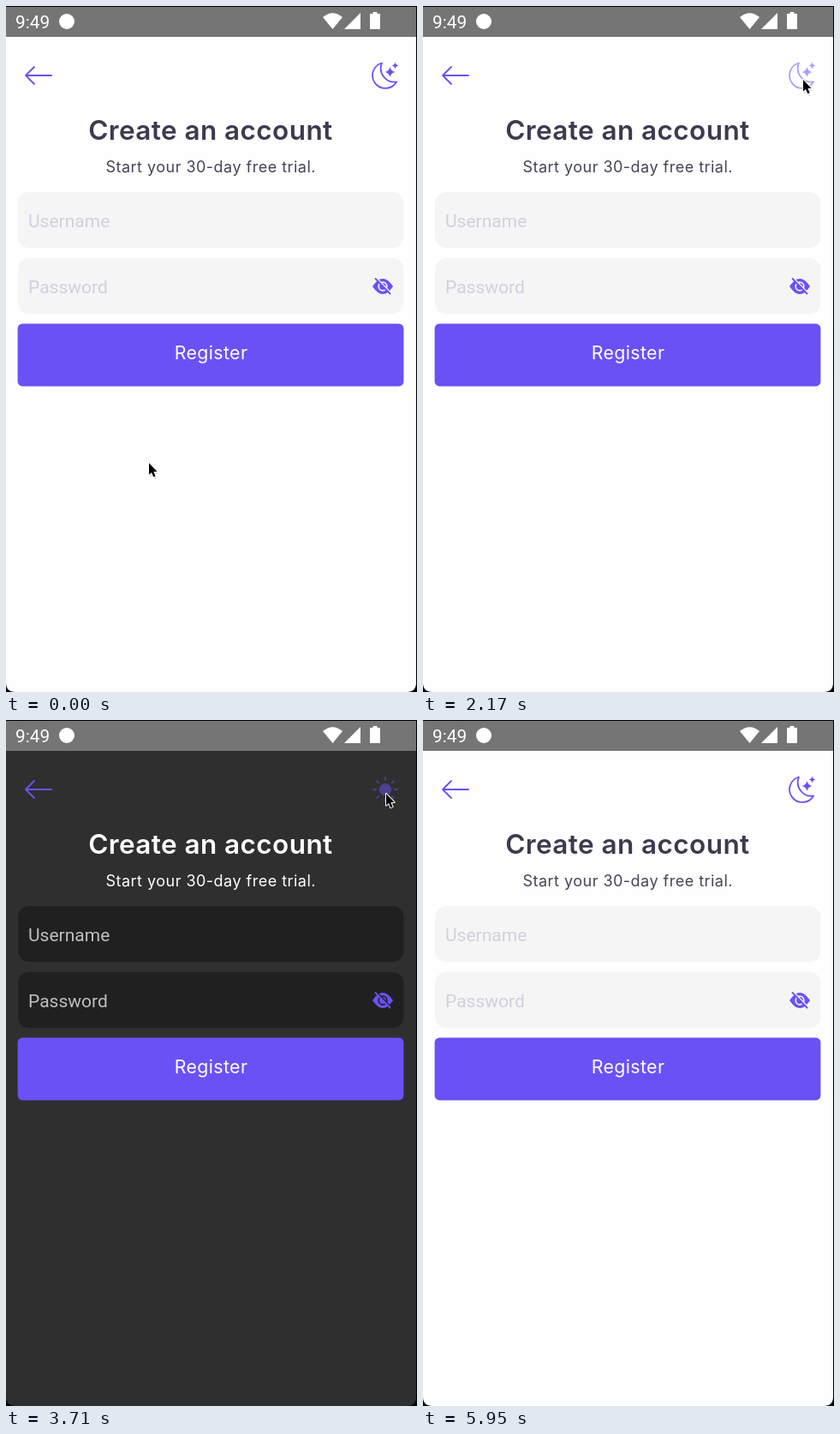
These frames come from a looping animation (480 by 800 pixels, 6020 ms). An HTML page:

```html
<!DOCTYPE html>
<html lang="en">
<head>
<meta charset="utf-8">
<title>Create an account</title>
<style>
  html, body { margin: 0; width: 100%; height: 100%; overflow: hidden; background: #000; }
  svg { display: block; width: 480px; height: 800px; }

  /* The 1 ms head start keeps each step on its 70 ms boundary. */
  .stage, .toggle, .cursor { animation: theme 6020ms -1ms infinite step-end; }
  .toggle { animation-name: press; }
  .cursor { animation-name: travel; }

  .screen { fill: var(--bg); }
  .field { fill: var(--field); }
  .hint { fill: var(--hint); font: 21px Roboto, sans-serif; }
  .title, .sub, .label { font-family: Poppins, Inter, sans-serif; text-anchor: middle; }
  .title { fill: var(--title); font-size: 31.5px; font-weight: 600; letter-spacing: .42px; }
  .sub { fill: var(--sub); font-size: 18px; letter-spacing: .48px; }
  .label { fill: #fff; font-size: 21.3px; letter-spacing: .4px; }
  .clock { fill: #fff; font: 20.8px Roboto, sans-serif; }
  .fill { fill: #6a51f5; }
  .line { fill: none; stroke: #6a51f5; stroke-width: 1.8; stroke-linecap: round; stroke-linejoin: round; }
  .cut { fill: none; stroke: var(--field); stroke-width: 1.7; }
  .moon { visibility: var(--moon); }
  .sun { visibility: var(--sun); }

  @keyframes theme {
    0%, 62.791%, 100% {
      --bg: #fefefe; --field: #f5f5f5; --hint: #d2d0de; --title: #3c3a4e; --sub: #454357;
      --moon: visible; --sun: hidden;
    }
    37.209% {
      --bg: #2f2f2f; --field: #202020; --hint: #bfbfbf; --title: #fff; --sub: #fff;
      --moon: hidden; --sun: visible;
    }
  }

  @keyframes press {
    0%, 41.86%, 67.442%, 100% { opacity: 1; }
    34.884%, 60.465% { opacity: .8; }
    36.047%, 62.791% { opacity: .55; }
    37.209%, 61.628% { opacity: .5; }
    38.372%, 63.953% { opacity: .65; }
    39.535%, 65.116% { opacity: .8; }
    40.698%, 66.279% { opacity: .92; }
  }

  @keyframes travel {
    0% { transform: translate(167px, 533px); animation-timing-function: steps(4); }
    4.651%, 11.628% { transform: translate(169px, 531px); animation-timing-function: steps(4); }
    16.279% { transform: translate(322px, 282px); animation-timing-function: steps(4); }
    20.93% { transform: translate(438px, 94px); animation-timing-function: steps(4); }
    25.581%, 77.907% { transform: translate(444px, 86px); animation-timing-function: steps(5); }
    83.721% { transform: translate(402px, 360px); animation-timing-function: steps(5); }
    89.535%, 100% { transform: translate(330px, 812px); }
  }
</style>
</head>
<body>
<svg class="stage" viewBox="0 0 480 800">
  <rect width="480" height="800"/>
  <path class="screen" d="M0 1H479V789Q479 800 468 800H11Q0 800 0 789Z"/>

  <rect y="1" width="479" height="35" fill="#757575"/>
  <text class="clock" x="11" y="26">9:49</text>
  <g fill="#fff">
    <circle cx="71" cy="18" r="9"/>
    <path d="M370 13Q381.5 3.5 393 13L381.5 27Z"/>
    <path d="M395 27H414V8Z"/>
    <path d="M428.5 7H433.5V9H437V27H425V9H428.5Z"/>
  </g>

  <path class="line" d="M53 81H23M33 71L23 81L33 91"/>

  <g class="toggle">
    <g class="moon">
      <path class="line" d="M439 66.5A15 15 0 1 0 456 88.5A16 16 0 0 1 439 66.5Z"/>
      <path class="fill" d="M448.5 71Q449.5 76 454.5 77Q449.5 78 448.5 83Q447.5 78 442.5 77Q447.5 76 448.5 71Z"/>
      <path class="fill" d="M454.5 65.5Q455.2 68.8 458.5 69.5Q455.2 70.2 454.5 73.5Q453.8 70.2 450.5 69.5Q453.8 68.8 454.5 65.5Z"/>
    </g>
    <g class="sun">
      <circle class="fill" cx="443" cy="81" r="7.2"/>
      <path class="line" d="M443 67V70M443 92V95M429 81H432M454 81H457M433.1 71.1L435.2 73.2M450.8 88.8L452.9 90.9M433.1 90.9L435.2 88.8M450.8 73.2L452.9 71.1"/>
    </g>
  </g>

  <text class="title" x="238.9" y="156">Create an account</text>
  <text class="sub" x="239.2" y="194">Start your 30-day free trial.</text>

  <rect class="field" x="14" y="217" width="450.5" height="65" rx="13"/>
  <text class="hint" x="26" y="258">Username</text>
  <rect class="field" x="14" y="294" width="450.5" height="65" rx="13"/>
  <text class="hint" x="26" y="335">Password</text>

  <path class="fill" d="M428 327Q440 309 452 327Q440 345 428 327Z"/>
  <circle class="cut" cx="440" cy="327" r="4.8"/>
  <path class="cut" d="M432.5 317L450 335"/>
  <path class="line" d="M431.5 318L448.5 335.5"/>

  <rect class="fill" x="13.6" y="370.6" width="450.8" height="72.8" rx="5.5"/>
  <text class="label" x="239.5" y="412">Register</text>

  <g class="cursor">
    <path d="M1 2V17L4 14L6.5 19L9 18L7 13H11Z" fill="#000" opacity=".12"/>
    <path d="M0 0V13.6L3 10.9L5.3 16.2L7.6 15.2L5.4 10H9.6Z" stroke="#fff" stroke-width="2" paint-order="stroke" stroke-linejoin="round"/>
  </g>
</svg>
</body>
</html>
```
